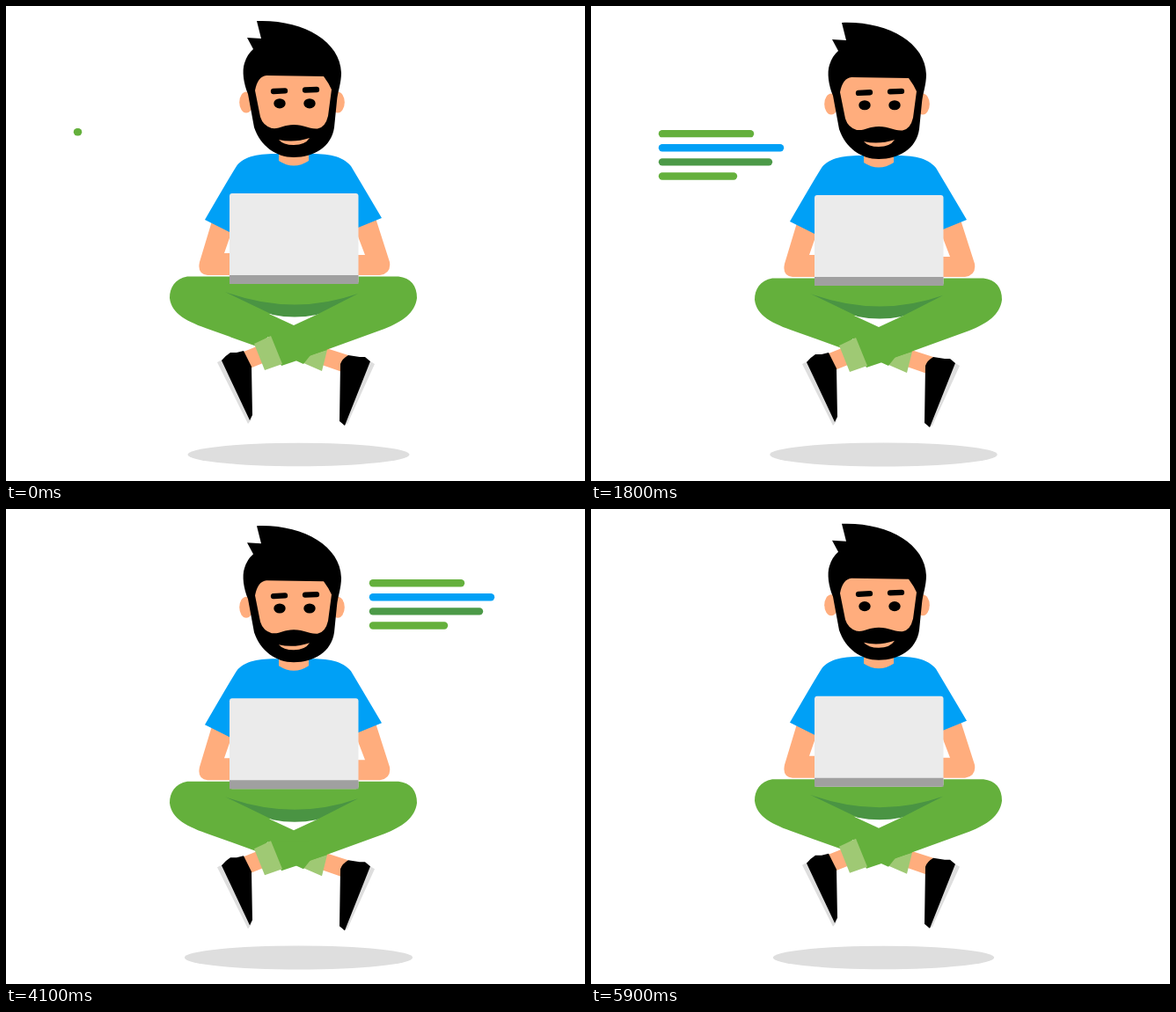
Animation, 658 px wide and 540 px high, one loop 6 s. Source, as an HTML page:

```html
<!DOCTYPE html>
<html lang="en">
<head>
<meta charset="utf-8">
<title>Floating coder</title>
<style>
  html, body { margin: 0; width: 100%; height: 100%; overflow: hidden; background: #fff; }
  svg { display: block; width: 100vw; height: 100vh; }
  .skin { fill: #ffad7d; }
  .blue { fill: #00a0f6; }
  .green { fill: #64b03c; }
  .dark { fill: #4a9443; }
  .cuff { fill: #9fc974; }
  .sole { fill: #dedede; }
  .bar { fill: none; stroke-width: 8.4; stroke-linecap: round; }
</style>
</head>
<body>
<svg viewBox="0 0 658 540">
  <ellipse id="shadow" cx="332.5" cy="510" fill="#dedede"/>
  <g id="floating">
    <g id="bars"></g>

    <!-- shoes and ankles -->
    <path class="sole" d="M240 405L246 402L279 470L275 475Z M414 404L419 407L388 475L383 477Z"/>
    <path class="skin" d="M270 393L285 387L292 406L277 412Z M364 389L389 397L382 416L359 408Z"/>
    <path d="M245 403Q250 397 255 394L262 394L270 392L279 410L280 465L277 471Z
             M380 407Q382 401 389 397L402 399L408 399L414 404L385 477L379 472Z"/>

    <!-- legs -->
    <path class="cuff" d="M336 405L343 391L365 391L359 415Z"/>
    <path class="green" d="M206 307.500H446C460 309 467 318 467 332C465 349 450 359 430 367L328 404L313 409
             L298 376L285 387L232 368C206 359 188 350 186 332C186 320 192 310 206 307.500Z"/>
    <path class="green" d="M300 376L345 376L365 391L346 397L338 407L327 402L313 408Z"/>
    <path class="cuff" d="M282 384L301 375L314 407L294 414Z"/>
    <path fill="#fff" d="M299 350L327 363L355 350Z"/>
    <path class="dark" d="M249 325Q326 353 400 327L353 351Q328 356 303 351Z"/>

    <!-- torso and arms -->
    <path class="skin" d="M236 238L220 291Q217 305 229 306H256V281H248L256 258Z
             M419 238L436 291Q438 304 425 306H398V283H408L400 262V240Z"/>
    <path class="blue" d="M310 168C288 168 271 170 262 182Q255 193 226 243L254 257V308H400V252L427 241
             Q401 197 392 182C382 170 366 168 344 168Z"/>
    <path class="skin" d="M310 160H344V176Q327 187 310 176Z"/>
    <rect x="254" y="213" width="146.500" height="103" rx="3" fill="#ebebeb"/>
    <path fill="#a0a0a0" d="M254 306H400.500V316H254Z"/>

    <!-- head -->
    <ellipse class="skin" cx="273" cy="109.500" rx="7.800" ry="12"/>
    <ellipse class="skin" cx="377" cy="109.500" rx="7.800" ry="12"/>
    <path d="M285 17C336 15 380 39 381 76C381 88 377 97 376 108L373 138C370 160 350 172 327 172
             C307 172 289 159 282 138L275 100C270 88 268 74 271 65Q274 55 281 49L274 36L290 37Z"/>
    <path class="skin" d="M296 79L361 80Q367 88 370 95L366 125Q363 138 354 139.500C343 140 340 135 327 135
             C315 135 312 140 302 139Q292 136 289 126L283 96Q286 80 296 79Z"/>
    <path class="skin" d="M310 152Q327 156 345 150Q340 158 327 158Q315 158 310 152Z"/>
    <path d="M304 97L317 96.300M340 95.500L353 95" fill="none" stroke="#000"
          stroke-width="6.300" stroke-linecap="round"/>
    <ellipse class="eye" cx="311" cy="110.800" rx="6.700"/>
    <ellipse class="eye" cx="345" cy="110.800" rx="6.700"/>
  </g>
</svg>
<script>
const LOOP = 6000, STEP = 100, DRAW = 260, WIPE = 367, BLINK = 2500;
const GREEN = '#64b03c', BLUE = '#00a0f6', DARK = '#4c9a48';
const rows = [[100, GREEN], [134, BLUE], [121, DARK], [81, GREEN]];
const blocks = [
  { x: 81, y: 143.2, drawAt: -17, wipeAt: 1954 },
  { x: 417, y: 82, drawAt: 2100, wipeAt: 4118 }
];

const $ = id => document.getElementById(id);
const eyes = document.querySelectorAll('.eye');
const clamp = v => Math.min(1, Math.max(0, v));
const ease = p => (1 - Math.cos(Math.PI * clamp(p))) / 2;

const bars = blocks.flatMap(block => rows.map(([length, color], row) => {
  const el = document.createElementNS('http://www.w3.org/2000/svg', 'path');
  el.setAttribute('class', 'bar');
  el.setAttribute('stroke', color);
  $('bars').append(el);
  return { el, length, row, ...block };
}));

function drawBar({ el, length, row, x, y, drawAt, wipeAt }, t) {
  const head = ease((t - drawAt) / DRAW - row);
  const tail = ease((t - wipeAt) / WIPE - row);
  el.setAttribute('d', head > tail
    ? `M${x + length * tail} ${y + row * 16.1}H${x + length * head}` : '');
}

function render(t) {
  const lift = 14 * Math.sin((t + 55) / 2000 * Math.PI) - 1.2;
  $('floating').setAttribute('transform', `translate(0 ${lift})`);

  const radius = 126 + 1.55 * lift + 0.05 * lift * lift;
  $('shadow').setAttribute('rx', radius);
  $('shadow').setAttribute('ry', radius * 0.105);

  const nearest = Math.max(1, Math.round(t / BLINK)) * BLINK;
  const open = nearest < LOOP ? clamp(Math.abs(t - nearest) / 165) : 1;
  eyes.forEach(eye => eye.setAttribute('ry', Math.max(1, 5.6 * open)));

  bars.forEach(bar => drawBar(bar, t));
}

const start = performance.now();
function tick() {
  const t = Math.max(0, performance.now() - start) % LOOP;
  render(Math.floor(t / STEP) * STEP);
  requestAnimationFrame(tick);
}
tick();
</script>
</body>
</html>
```
